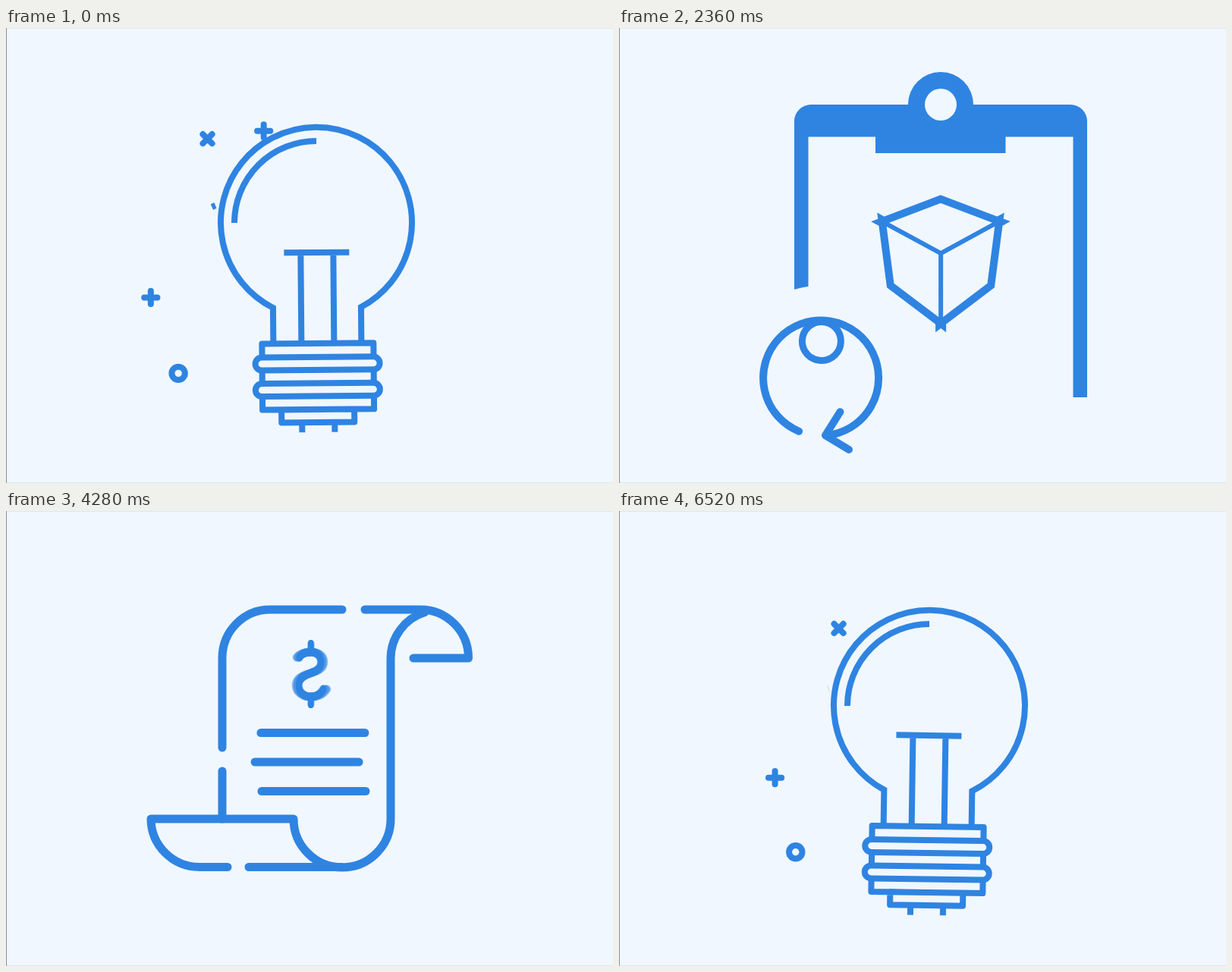
These frames come from a looping animation (800x600 px, 6560 ms). An HTML page:

```html
<!DOCTYPE html>
<html lang="en">
<head>
<meta charset="utf-8">
<title>Idea, plan, invoice</title>
<style>
  :root { --ink: #2f84e2; --paper: #f0f7ff; }
  html, body { margin: 0; width: 100%; height: 100%; overflow: hidden; background: var(--paper); }
  svg { display: block; width: 800px; height: 600px; }
  .line { fill: none; stroke: var(--ink); stroke-width: 8; }
  .shell { fill: var(--paper); stroke: var(--ink); stroke-width: 8; stroke-linejoin: round; }
  .round { stroke-linecap: round; stroke-linejoin: round; }
  .solid { fill: var(--ink); }
  .blank { fill: var(--paper); }
  .pen { stroke-width: 11; }
  .orbit { stroke-dasharray: 1 2; }
</style>
</head>
<body>
<svg viewBox="0 0 800 600">
  <defs>
    <path id="plus" class="line round" d="M-8.6 0H8.6M0 -8.6V8.6"/>
    <use id="cross" href="#plus" transform="rotate(45)"/>
    <circle id="dot" class="line" r="8.7"/>
    <g id="dollar" class="line round">
      <path class="pen" d="M17.5 -21C13.5 -26 6.5 -28 -1.5 -28C-11.5 -28 -18.5 -23 -18.5 -15C-18.5 -6 -10.5 -3 -.5 0C10.5 3 18.5 7 18.5 16C18.5 25 9.5 31 -1.5 31C-10.5 31 -17.5 28 -22.5 21"/>
      <path stroke-width="9" d="M-1.5 -39.5V-28M-1.5 31V41.5"/>
    </g>
  </defs>

  <g id="idea">
    <g id="sparks"></g>
    <g id="bulb">
      <path class="shell" style="stroke-linejoin:miter" d="M351 416V368.5A126 126 0 1 1 467 368.5V416"/>
      <path class="line" d="M366 296H452M388 296V416M431 296V416"/>
      <path class="line" d="M388 520V533M431 520V533"/>
      <path class="shell" d="M361 503H457V520H361ZM336 416H483V503H336Z"/>
      <rect class="shell" x="327" y="434" width="164" height="17" rx="8.5"/>
      <rect class="shell" x="327" y="468.5" width="164" height="17" rx="8.5"/>
    </g>
    <path class="line" d="M409 149A108 108 0 0 0 301 257"/>
    <path class="line orbit" pathLength="1" d="M276 234A165 49 2 1 0 546 241"/>
    <path class="line orbit" pathLength="1" d="M337 139.500A194 34 47 1 0 521 343"/>
    <path class="line orbit" pathLength="1" d="M482 139.500A194 34 -47 1 1 298 343"/>
  </g>

  <g id="plan">
    <path class="solid" d="M231 350V123A22 22 0 0 1 253 101H595A22 22 0 0 1 617 123V487H598.500V143.500H249.500V350Z"/>
    <g id="clip">
      <path class="solid" d="M338 125H509.500V165H338Z"/>
      <circle class="solid" cx="424" cy="101" r="43"/>
      <circle class="blank" cx="424" cy="101" r="21"/>
    </g>
    <circle class="blank" cx="265" cy="461" r="121"/>
    <path class="line cube" style="stroke-width:14"/>
    <path class="shell cube" style="stroke-width:6"/>
    <g id="cycle">
      <path class="line round" stroke-linejoin="round" style="stroke-width:10" d="M297 530A76 76 0 1 1 325.500 508M316 473L325 508.500L360 499"/>
      <circle class="line" style="stroke-width:9" cx="231.500" cy="426.500" r="25.500"/>
    </g>
  </g>

  <g id="invoice">
    <g class="line round pen">
      <path d="M443 130H348A63 64 0 0 0 285 194V312M285 343V406"/>
      <path d="M473 130H546A63.500 64 0 0 1 609.500 194H537"/>
      <path d="M552 133.500A64 64 0 0 0 507 194V406A64 64 0 0 1 379 406H191A64 64 0 0 0 255 469.500H292M320 469.500H443"/>
      <path class="row" d="M330 292.500H467"/>
      <path class="row" d="M330 331H467"/>
      <path class="row" d="M330 369.500H467"/>
    </g>
    <g id="coin"></g>
  </g>

  <path fill="#e0e6ed" d="M0 0H800V1H0ZM0 599H800V600H0Z"/>
  <path fill="#8b8f94" d="M0 0H1V600H0Z"/>
</svg>

<script>
const LOOP = 6560;
const $ = id => document.getElementById(id);
const all = sel => [...document.querySelectorAll(sel)];
const set = (el, name, value) => el.setAttribute(name, value);
const ramp = (t, from, length) => Math.min(1, Math.max(0, (t - from) / length));
const easeOut = (p, n) => 1 - (1 - p) ** n;
const easeInOut = (p, n) => p < .5 ? (2 * p) ** n / 2 : 1 - (2 - 2 * p) ** n / 2;
const ring = (s, decay, speed) => Math.exp(-decay * s) * Math.cos(speed * s);

function addUse(parent, shape) {
  const el = document.createElementNS('http://www.w3.org/2000/svg', 'use');
  set(el, 'href', '#' + shape);
  return parent.appendChild(el);
}

function showScene(id, t, start, rise, end) {
  const alpha = ramp(t, start, rise) * (1 - ramp(t, end, 400));
  $(id).style.opacity = alpha;
  $(id).style.display = alpha ? '' : 'none';
  return alpha > 0;
}

// shape, resting x and y, offset of the hidden start, launch time
const sparks = [
  ['dot', 231, 451.5, 100, -100, -204],
  ['plus', 188.5, 356, 130, -33, -164],
  ['cross', 243, 138, 102, 37, -103],
  ['plus', 327, 80, 25, 110, -56],
  ['dot', 448, 89.5, -8, 105, 0],
  ['plus', 585, 192.5, -95, 24, 50],
  ['cross', 613.5, 293.5, -124, -22, 100],
  ['dot', 568, 347.5, -98, -28, 150],
  ['plus', 551.5, 442.5, -97, -92, 200]
].map(([shape, x, y, dx, dy, at]) => ({ el: addUse($('sparks'), shape), x, y, dx, dy, at }));

function drawIdea(u) {
  const swing = 115 * ring((u - 5740) / 1000, 4.4, 9.76);
  set($('bulb'), 'transform', `rotate(${swing} 409 257)`);
  for (const { el, x, y, dx, dy, at } of sparks) {
    const s = (u - LOOP - at) / 1000;
    const r = ring(s, 9.5, 9);
    el.style.display = s > 0 ? '' : 'none';
    set(el, 'transform', `translate(${x + dx * r} ${y + dy * r})`);
  }
  all('.orbit').forEach((el, i) => {
    const p = easeInOut(ramp(u, LOOP - 50 + i * 80, 700), 2);
    el.style.strokeDashoffset = 1 - p;
    el.style.display = p ? '' : 'none';
  });
}

// Corners 0-3 are the top of the unit-radius cube, 4-7 the bottom.
const FACES = [[0, 1, 2, 3], ...[0, 1, 2, 3].map(i => [i, i + 4, (i + 1) % 4 + 4, (i + 1) % 4])];
const PITCH = 33.5 * Math.PI / 180;

function corner(i, yaw) {
  const a = yaw + i * Math.PI / 2;
  const z = Math.cos(a), y = i < 4 ? Math.SQRT1_2 : -Math.SQRT1_2;
  const k = 352 / (5.08 - y * Math.sin(PITCH) - z * Math.cos(PITCH));
  return [424 + k * Math.sin(a), 300.5 + k * (z * Math.sin(PITCH) - y * Math.cos(PITCH))];
}

function cubePath(yaw) {
  const pts = Array.from({ length: 8 }, (_, i) => corner(i, yaw));
  return FACES.map(f => f.map(i => pts[i])).filter(([a, b, c]) =>
    (b[0] - a[0]) * (c[1] - a[1]) - (b[1] - a[1]) * (c[0] - a[0]) < 0
  ).map(f => 'M' + f.map(p => p.map(v => v.toFixed(2)).join(' ')).join('L') + 'Z').join('');
}

function drawPlan(t) {
  set($('clip'), 'transform', `translate(0 ${-49 * (1 - easeOut(ramp(t, 1480, 180), 2))})`);
  const d = cubePath((24 + 132 * (t - 1680) / 1360) * Math.PI / 180);
  all('.cube').forEach(el => set(el, 'd', d));
  const turn = 360 * (1 - easeOut(ramp(t, 1720, 1000), 2));
  const size = easeOut(ramp(t, 1720, 240), 2);
  set($('cycle'), 'transform', `translate(265 461) rotate(${turn}) scale(${size}) translate(-265 -461)`);
  $('cycle').style.display = size ? '' : 'none';
}

// Copies of the sign averaged over a short shutter give the motion blur.
const coins = Array.from({ length: 7 }, (_, i) => {
  const el = addUse($('coin'), 'dollar');
  el.style.opacity = 1 / (i + 1);
  return el;
});
const rows = [[1, 3804], [-1, 3704], [1, 3822]];

function drawInvoice(t) {
  all('.row').forEach((el, i) => {
    const [side, at] = rows[i];
    const p = ramp(t, at, 800);
    set(el, 'transform', `translate(${side * 90 * (1 - p) ** 3} 0)`);
    el.style.opacity = ramp(t, at, 160);
  });
  coins.forEach((el, i) => {
    const p = easeInOut(ramp(t + (i - 3) * 4, 3830, 900), 3);
    set(el, 'transform', `translate(400.5 214) scale(${Math.cos(p * 6 * Math.PI)} 1)`);
  });
}

function draw(t) {
  const u = t < 3000 ? t + LOOP : t;
  if (showScene('idea', u, 5720, 120, LOOP + 1110)) drawIdea(u);
  if (showScene('plan', t, 1460, 180, 2973)) drawPlan(t);
  if (showScene('invoice', t, 3400, 180, 5256)) drawInvoice(t);
}

const start = performance.now();
function tick(now) {
  draw(Math.max(0, now - start) % LOOP);
  requestAnimationFrame(tick);
}
draw(0);
requestAnimationFrame(tick);
</script>
</body>
</html>
```
